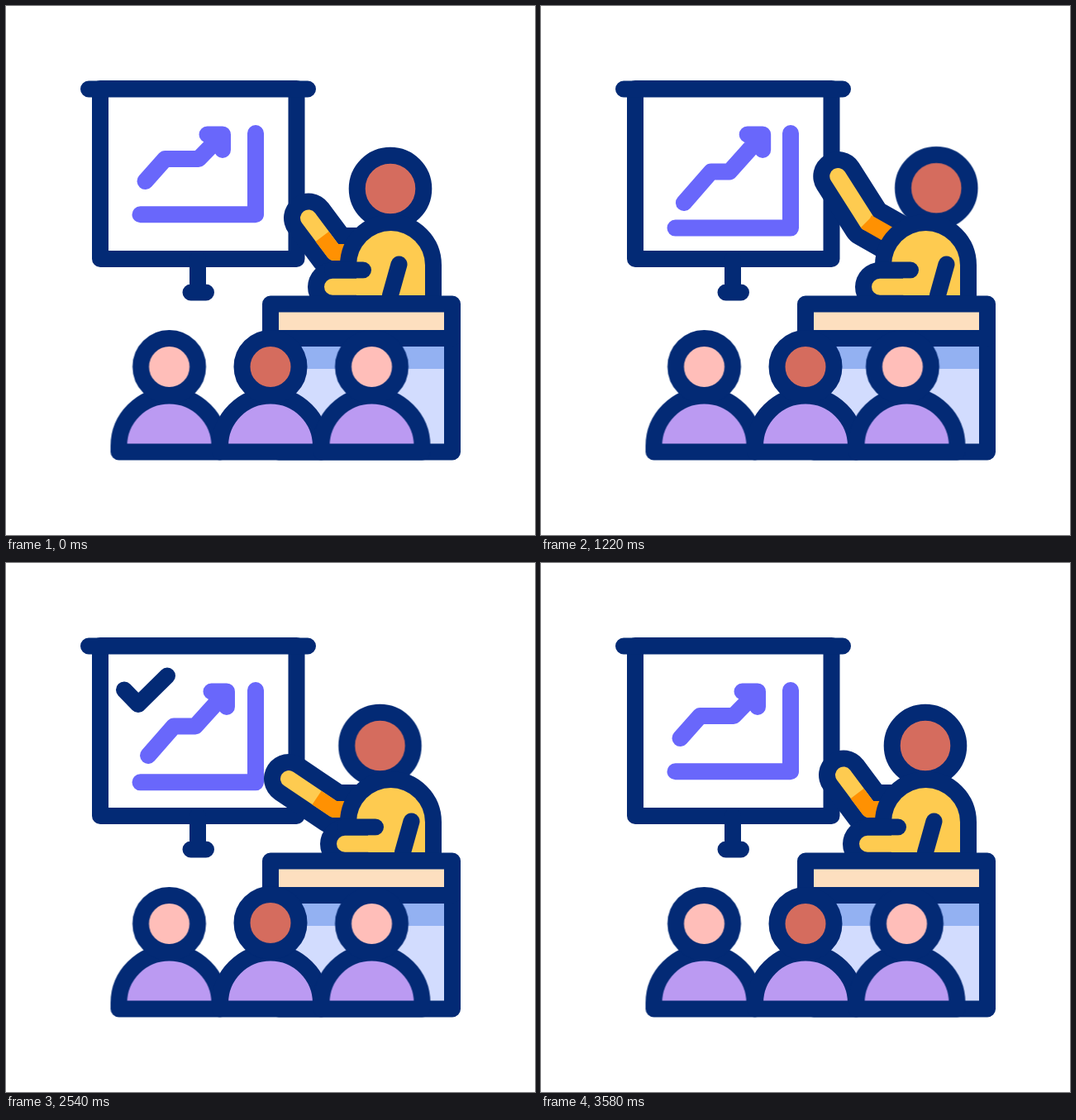
Animation, 640 px wide and 640 px high, one loop 3600 ms. Source, as an HTML page without scripts:

```html
<!DOCTYPE html>
<html lang="en">
<head>
<meta charset="utf-8">
<title>Presentation</title>
<style>
  html, body { margin: 0; width: 100%; height: 100%; overflow: hidden; background: #fff; }
  svg {
    display: block; width: 100%; height: 100%;
    --navy: #032a75; --yellow: #fecb50; --brown: #d56c5e; --pink: #ffbeb9;
    stroke-width: 20; stroke-linecap: round; stroke-linejoin: round;
  }
  .ink { stroke: var(--navy); }
  .line { fill: none; }
  .yellow { stroke: var(--yellow); }
  .brown { fill: var(--brown); }
  .pink { fill: var(--pink); }
  .chart { stroke: #6967fb; }

  .axis, .trend, .arm, .cuff, .lean, .gesture, .tick, .head {
    animation: 3.6s cubic-bezier(.35, 0, .65, 1) infinite;
  }
  .axis { animation-name: axis; }
  .trend { animation-name: trend; }
  .arm { animation-name: arm; }
  .forearm { animation-name: forearm; }
  .cuff { animation-name: cuff; stroke: #ff9102; stroke-linecap: butt; }
  .lean { animation-name: lean; }
  .gesture { animation-name: gesture; }
  .tick { animation-name: tick; stroke: var(--navy); stroke-dasharray: 1 2; }
  .first { animation-name: first; }
  .second { animation-name: second; }
  .third { animation-name: third; }

  /* chart stretches, holds, then relaxes */
  @keyframes axis {
    0%, 98.33%, 100% { d: path("M302 154 L302 252.3 L162.5 252.3"); }
    43.33%, 55% { d: path("M302 154 L302 270.7 L162.5 270.7"); }
  }
  @keyframes trend {
    0%, 98.33%, 100% { d: path("M168.5 212 L192.5 185 L233 185 L262 155.5 M243.5 155.5 L262 155.5 L262 174"); }
    43.33%, 55% { d: path("M173.5 241.5 L207.5 202.5 L227.5 202.5 L269 155.5 M250.5 155.5 L269 155.5 L269 174"); }
  }

  /* arm: raise, drift, drop, point at the board, return */
  @keyframes arm {
    0%, 55.56%, 87.22%, 100% { d: path("M366 256.5 L397 298 L440 298"); }
    12.78% { d: path("M365 207 L395 262 L439 287"); animation-timing-function: linear; }
    42.22%, 43.33% { d: path("M357 205.5 L395 262 L439 287"); }
    69.44%, 71.11% { d: path("M342 261 L397 298 L440 298"); }
  }
  @keyframes forearm {
    0%, 55.56%, 87.22%, 100% { d: path("M366 256.5 L397 298"); }
    12.78% { d: path("M365 207 L395 262"); animation-timing-function: linear; }
    42.22%, 43.33% { d: path("M357 205.5 L395 262"); }
    69.44%, 71.11% { d: path("M342 261 L397 298"); }
  }
  @keyframes cuff {
    0%, 55.56%, 87.22%, 100% { d: path("M382.5 279 L397 298 L440 298"); }
    12.78%, 43.33% { d: path("M394 261 L395 262 L439 287"); }
    69.44%, 71.11% { d: path("M376 284 L397 298 L440 298"); }
  }

  @keyframes lean {
    0%, 98.33%, 100% { transform: none; }
    12.22%, 43.33% { transform: translate(13.3px, -.8px); }
    55.83%, 86.67% { transform: translateX(-12.5px); }
  }
  @keyframes gesture {
    0%, 98.33%, 100% { transform: none; }
    12.22%, 86.67% { transform: translateX(15px); }
  }
  @keyframes tick {
    0%, 53.8% { stroke-dashoffset: 1; opacity: 0; }
    53.9% { stroke-dashoffset: 1; opacity: 1; }
    59.5% { stroke-dashoffset: 0; }
    70.83% { stroke: var(--navy); }
    80% { stroke: #91b704; }
    90.5% { stroke-dashoffset: 0; }
    97.5% { stroke-dashoffset: 1; opacity: 1; stroke: #91b704; }
    97.6%, 100% { stroke-dashoffset: 1; opacity: 0; stroke: #91b704; }
  }

  /* listeners take turns moving */
  @keyframes first {
    0%, 32.22%, 100% { transform: none; }
    12.78%, 19.44% { transform: translateX(21.5px); }
  }
  @keyframes second {
    0%, 68.89%, 87.22%, 100% { transform: none; }
    76.11%, 77.22% { transform: translateY(-8px); }
  }
  @keyframes third {
    0%, 30.28%, 55%, 100% { transform: none; }
    41.67%, 42.78% { transform: translateX(-21.5px); }
  }
</style>
</head>
<body>
<svg viewBox="0 0 640 640">
  <defs>
    <path id="bust" class="ink" fill="#bb9af2" d="M-61 539.5v-7a61 61 0 0 1 122 0v7z"/>
    <circle id="face" class="ink" cy="436.5" r="34.5"/>
  </defs>

  <g class="ink line">
    <path d="M114 100V306H351.5V100z" fill="#fff"/>
    <path d="M100 100.5H365M232 306V346M223.5 346.5H242"/>
  </g>

  <g class="chart line">
    <path class="axis" d="M302 154 L302 252.3 L162.5 252.3"/>
    <path class="trend" d="M168.5 212 L192.5 185 L233 185 L262 155.5 M243.5 155.5 L262 155.5 L262 174"/>
  </g>
  <path class="tick line" pathLength="1" d="M143 153.5L160 171L195 136.5"/>

  <g class="line">
    <path class="arm ink" stroke-width="60" d="M366 256.5 L397 298 L440 298"/>
    <path class="arm forearm yellow" d="M366 256.5 L397 298"/>
    <path class="cuff" d="M382.5 279 L397 298 L440 298"/>
  </g>
  <circle class="lean ink brown" cx="465" cy="221" r="40.3"/>
  <path class="ink" fill="#fecb50" stroke-width="40" paint-order="stroke"
        d="M424 350V313.5a41.5 41.5 0 0 1 83 0V350z"/>
  <g class="gesture line">
    <circle cx="395" cy="340" r="30" fill="#032a75"/>
    <path class="ink" d="M395 319.5H432"/>
    <path class="yellow" d="M395 339.7H452"/>
    <path class="ink" d="M475.5 312.5L465 350"/>
  </g>

  <path fill="#d2dcfe" d="M330 402H540V540H330z"/>
  <path fill="#93b1f2" d="M330 402H540V439H330z"/>
  <path class="ink line" d="M330 402H540V539.5H330z"/>
  <path class="ink" fill="#fddfbf" d="M320 360.5H540V402H320z"/>

  <g transform="translate(197.5)">
    <use href="#bust"/>
    <g class="head first pink"><use href="#face"/></g>
  </g>
  <g transform="translate(320)">
    <use href="#bust"/>
    <g class="head second brown"><use href="#face"/></g>
  </g>
  <g transform="translate(442.5)">
    <use href="#bust"/>
    <g class="head third pink"><use href="#face"/></g>
  </g>
</svg>
</body>
</html>
```
